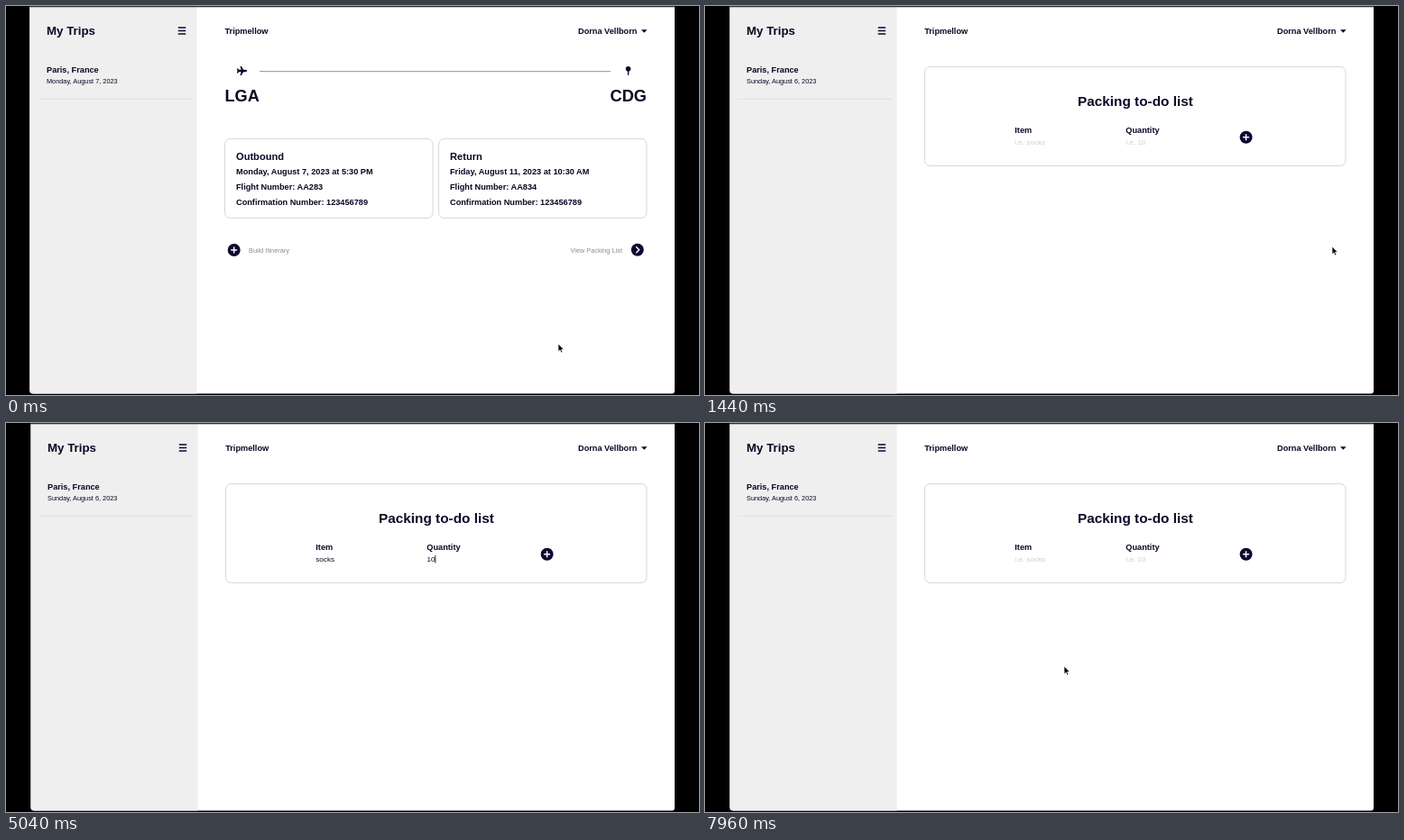
Recreate the animation shown at these times as an HTML page. Size 768 by 432 pixels, loop 8 s.

```html
<!DOCTYPE html>
<html lang="en">
<head>
<meta charset="utf-8">
<title>Packing list demo</title>
<style>
  html, body { margin: 0; width: 100%; height: 100%; overflow: hidden; background: #000; }
  svg { display: block; width: 768px; height: 432px; }
  text { font: bold 9.2px "Liberation Sans", Arial, sans-serif; fill: #0b0726; white-space: pre; }
  .h1 { font-size: 13.3px; }
  .code { font-size: 18.2px; }
  .h2 { font-size: 15.35px; }
  .h3 { font-size: 11.1px; }
  .small { font-size: 7.35px; font-weight: normal; }
  .field { font-size: 8.1px; font-weight: normal; }
  .grey { fill: #8b8b8f; }
  .hint { fill: #cfcfd2; }
  .card { fill: #fff; stroke: #d8d8da; }
  .ink { fill: #0b0730; }
  .line { fill: none; stroke: #0b0730; stroke-width: 1.4; }
  .mark { fill: none; stroke: #fff; stroke-width: 1.5; stroke-linecap: round; stroke-linejoin: round; }
</style>
</head>
<body>
<svg viewBox="0 0 768 432">
  <defs>
    <path id="menu" class="line" d="M-4.2-3.5H4.2M-4.2 0H4.2M-4.2 3.5H4.2"/>
    <g id="add">
      <circle class="ink" r="7"/>
      <path class="mark" d="M-3 0H3M0-3V3"/>
    </g>
  </defs>

  <path id="window" fill="#fff"/>
  <path id="sidebar" fill="#efefef"/>
  <path d="M27 .8H741" stroke="#3c4550" stroke-width="1"/>
  <path d="M36 103.5H207" stroke="#e0e0e0"/>
  <g id="sideText">
    <text class="h1" x="45" y="32">My Trips</text>
    <use href="#menu" x="195" y="27.5"/>
    <text x="45" y="74.3">Paris, France</text>
    <text id="date" class="small" x="45" y="86.2"></text>
  </g>
  <text id="brand" y="31.2">Tripmellow</text>
  <text x="634" y="31.2">Dorna Vellborn</text>
  <path class="ink" d="M704 26.2H710.6L707.3 29.8Z"/>

  <g id="tripPage">
    <path class="ink" transform="translate(261.5 72)" d="M3.9-1.3Q5.8-1 5.8 0T3.9 1.3H1.6L-.5 5H-2L-.9 1.3H-3.4L-4.4 2.6H-5.6L-5 0L-5.6-2.6H-4.4L-3.4-1.3H-.9L-2-5H-.5L1.6-1.3Z"/>
    <path d="M281 72.7H670" stroke="#8f8f94"/>
    <circle class="ink" cx="689.6" cy="69.8" r="2.8"/>
    <path class="line" d="M689.6 72V76.8"/>
    <text class="code" x="242.5" y="106">LGA</text>
    <text class="code" x="710" y="106" text-anchor="end">CDG</text>

    <rect class="card" x="242.5" y="147.5" width="230.5" height="88" rx="6"/>
    <text class="h3" x="255" y="170.5">Outbound</text>
    <text x="255" y="187.4">Monday, August 7, 2023 at 5:30 PM</text>
    <text x="255" y="204.2">Flight Number: AA283</text>
    <text x="255" y="220.8">Confirmation Number: 123456789</text>

    <rect class="card" x="479.5" y="147.5" width="230.5" height="88" rx="6"/>
    <text class="h3" x="492" y="170.5">Return</text>
    <text x="492" y="187.4">Friday, August 11, 2023 at 10:30 AM</text>
    <text x="492" y="204.2">Flight Number: AA834</text>
    <text x="492" y="220.8">Confirmation Number: 123456789</text>

    <use href="#add" x="252.7" y="271"/>
    <text class="small grey" x="269" y="273.5">Build Itinerary</text>
    <text class="small grey" x="625.5" y="273.5">View Packing List</text>
    <circle class="ink" cx="699.8" cy="270.8" r="7"/>
    <path class="mark" d="M698.7 267.8L701.7 270.8L698.7 273.8"/>
  </g>

  <g id="listPage">
    <rect id="formCard" class="card" x="243.5" y="67.5" width="466.5" rx="6"/>
    <text class="h2" x="413" y="110.5">Packing to-do list</text>
    <text x="343.3" y="141.3">Item</text>
    <text x="466.3" y="141.3">Quantity</text>
    <text id="item" class="field" x="343.3" y="153.8"></text>
    <text id="quantity" class="field" x="466.5" y="153.8"></text>
    <path id="caret" d="M0 147V155.5" stroke="#0b0726" stroke-width=".9"/>
    <g id="error">
      <path d="M343.3 159H448" stroke="#a3553f"/>
      <text class="small" x="343.3" y="169.5" style="fill:#8c3d2a">can't be blank</text>
    </g>
    <use id="addItem" href="#add" x="599.6"/>
    <g id="packed">
      <rect class="card" x="243.5" y="209.2" width="226" height="63.3" rx="6"/>
      <text x="256.3" y="230">socks</text>
      <text class="field" x="256.3" y="251.6">qty. 10</text>
      <circle cx="406.4" cy="241.2" r="6" fill="#fff" stroke="#cfcfd4"/>
      <circle class="ink" cx="406.4" cy="241.2" r="3.3"/>
      <use href="#menu" x="440.5" y="240.5"/>
    </g>
  </g>

  <g id="status">
    <path d="M26.5 418H157Q160 418 160 421V430.5H26.5Z" fill="#7c7c7c"/>
    <text class="field" x="29.5" y="426.8" style="fill:#ececec">localhost:4000/trips/37/packing_list</text>
  </g>

  <path id="arrow" stroke="#fff" stroke-width=".7" d="M0 0V8.8L2 7L3.3 10L4.8 9.4L3.5 6.5H6.2Z"/>
  <path id="hand" fill="#fff" stroke="#15152a" stroke-width=".8" stroke-linejoin="round" d="M-1 .9Q0-.6 1 .9V4Q3.4 3.8 5 5V7.8L4 11H-.8L-3.2 7.2Q-3.4 5.6-1 7Z"/>
</svg>

<script>
const LOOP = 8000;
const OPEN_LIST = 1300, FAIL = 2200, FOCUS_ITEM = 3080, FOCUS_QUANTITY = 4380,
      SUBMIT = 5640, REMOVE = 7520;
const itemKeys = [3460, 3600, 3740, 3900, 4060];
const quantityKeys = [4700, 4860];

// Pointer stops: time, x, y
const stops = [
  [60, 612, 375], [860, 695, 267], [1440, 695, 267], [2080, 598.5, 141.5],
  [2560, 598.5, 141.5], [3000, 372, 148], [5100, 372, 148], [5440, 599, 142],
  [5700, 599, 142], [6060, 652, 166], [6700, 470, 262], [6960, 424, 263],
  [7240, 406, 240], [7600, 406, 240], [7920, 398, 270]
];

const el = {};
document.querySelectorAll('[id]').forEach(node => el[node.id] = node);

const show = (node, on) => node.style.display = on ? '' : 'none';
const between = (t, from, to) => t >= from && t < to;
const typed = (word, keys, t) => word.slice(0, keys.filter(key => t >= key).length);

function pointerAt(t) {
  const next = stops.findIndex(stop => stop[0] > t);
  if (next === 0) return stops[0].slice(1);
  if (next < 0) return stops[stops.length - 1].slice(1);
  const [t0, x0, y0] = stops[next - 1], [t1, x1, y1] = stops[next];
  const p = (t - t0) / (t1 - t0), ease = p * p * (3 - 2 * p);
  return [x0 + (x1 - x0) * ease, y0 + (y1 - y0) * ease];
}

function setField(node, value, hint) {
  node.textContent = value || hint;
  node.classList.toggle('hint', !value);
  return value ? node.getComputedTextLength() : 0;
}

function drawForm(t) {
  const open = t < SUBMIT;
  const itemWidth = setField(el.item, open ? typed('socks', itemKeys, t) : '', 'i.e. socks');
  const quantityWidth = setField(el.quantity, open ? typed('10', quantityKeys, t) : '', 'i.e. 10');
  const failed = between(t, FAIL, itemKeys[0]);
  const caretX = t < FOCUS_QUANTITY ? 343.6 + itemWidth : 466.8 + quantityWidth;

  el.caret.setAttribute('transform', `translate(${caretX} 0)`);
  show(el.caret, between(t, FOCUS_ITEM, 5560));
  show(el.error, failed);
  el.formCard.setAttribute('height', failed ? 125.5 : 110);
  el.addItem.setAttribute('y', failed ? 153 : 145.7);
  show(el.packed, between(t, SUBMIT, REMOVE));
}

function drawPointer(t) {
  const [x, y] = pointerAt(t);
  const visible = !between(t, itemKeys[0], 5100);
  const overButton = between(t, 780, OPEN_LIST + 60) || between(t, 2020, 2640)
    || between(t, 5400, 5760) || between(t, 7180, REMOVE);
  for (const node of [el.arrow, el.hand]) node.setAttribute('transform', `translate(${x} ${y})`);
  show(el.arrow, visible && !overButton);
  show(el.hand, visible && overButton);
}

function draw(t) {
  const onTrip = t < OPEN_LIST, left = onTrip ? 26.3 : 27.5;
  const corner = `V427Q${left} 430.5 ${left + 4} 430.5`;
  el.window.setAttribute('d', `M${left} 1${corner}H738Q741 430.5 741 427V1Z`);
  el.sidebar.setAttribute('d', `M${left} 1${corner}H${left + 185}V1Z`);
  el.sideText.setAttribute('transform', `translate(${onTrip ? 0 : 1} 0)`);
  el.brand.setAttribute('x', onTrip ? 242.5 : 243.2);
  el.date.textContent = onTrip ? 'Monday, August 7, 2023' : 'Sunday, August 6, 2023';
  show(el.tripPage, onTrip);
  show(el.listPage, !onTrip);
  show(el.status, between(t, 780, OPEN_LIST + 60));
  drawForm(t);
  drawPointer(t);
}

const start = performance.now();
function tick() {
  draw((performance.now() - start) % LOOP);
  requestAnimationFrame(tick);
}
tick();
</script>
</body>
</html>
```
